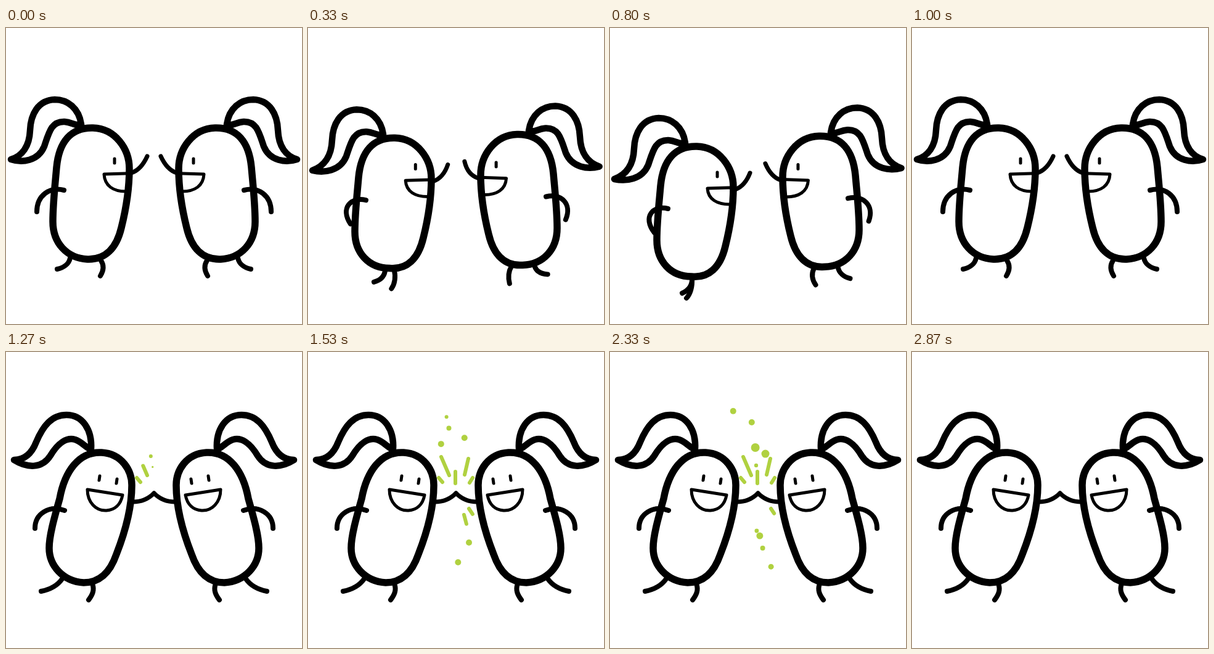
Recreate the animation shown at these times as an HTML page with a canvas. Size 480 by 480 pixels, loop 3.27 s.

```html
<!DOCTYPE html>
<html lang="en">
<head>
<meta charset="utf-8">
<title>High five</title>
<style>
  html, body { margin: 0; width: 100%; height: 100%; overflow: hidden; background: #fff; }
  canvas { display: block; width: 480px; height: 480px; }
</style>
</head>
<body>
<canvas id="stage" width="480" height="480"></canvas>
<script>
const ctx = document.getElementById('stage').getContext('2d');
const LOOP = 3270, STEP = 200 / 3, LAST = 43;
const GREEN = '#b0d140';

// Poses of the left figure; the right one is its mirror image.
const stand = {
  body: 'M141 162 C177 163 200 196 200 228 C200 262 193 300 187 324 C179 358 160 376 132 375 C98 373 76 348 76 314 C76 284 80 250 82 226 C86 184 106 161 141 162Z',
  tail: 'M122 156 C118 130 100 116 79 116 C52 117 40 140 39 166 C38 192 26 208 8 213 C26 219 52 216 62 192 C70 168 74 151 95 152 C108 153 114 160 122 156Z',
  eyes: 'M176 212 L176 219 M205 214 L205 221',
  mouth: 'M159 237 L222 235 C220 258 210 265 194 265 C174 265 160 256 159 237Z',
  arm: 'M203 235 Q219 230 229 208',
  back: 'M94 263 C70 257 50 272 50 298',
  legs: 'M104 373 C102 383 93 389 83 391 M154 377 C160 386 158 394 153 402'
};
const step = {
  ...stand,
  arm: 'M203 235 Q224 230 225 207',
  legs: 'M104 374 C100 383 92 385 80 384 M158 377 C166 385 166 394 166 402'
};
const dip = {
  ...stand,
  body: stand.body.replace('132 375', '132 373'),
  tail: stand.tail.replace('8 213', '7 215'),
  eyes: 'M174 204 L174 211 M205 206 L205 213',
  mouth: 'M158 230 L222 228 C220 249 210 256 194 256 C174 256 159 248 158 230Z',
  arm: 'M203 232 Q219 226 227 205',
  back: 'M94 263 C70 257 52 276 72 302',
  legs: 'M133 375 C134 388 126 396 117 400 M133 375 C134 390 130 402 124 408'
};
const clap = {
  body: 'M155 163 C188 165 204 192 204 216 C204 256 190 300 179 328 C168 360 150 374 126 374 C92 372 70 346 70 318 C70 298 78 270 87 238 C95 194 118 161 155 163Z',
  tail: 'M138 158 C140 126 124 102 98 102 C74 102 60 120 49 146 C42 164 30 175 13 175 C34 188 58 190 72 168 C84 148 98 138 112 142 C124 146 130 156 138 158Z',
  eyes: 'M152 201 L151 208 M180 206 L179 213',
  mouth: 'M132 223 L189 232 C186 248 176 256 163 257 C146 258 132 244 132 223Z',
  arm: 'M206 243 Q226 243 240 229',
  back: 'M95 257 C70 248 47 262 47 286',
  legs: 'M91 368 C84 378 72 385 57 388 M140 376 C144 386 140 394 134 402'
};

// [time, pose, drop]
const leftKeys = [[0, stand, 0], [267, dip, 19], [533, step, 0], [800, dip, 30], [1000, stand, 0], [1140, clap, 0]];
const rightKeys = [[0, stand, 0], [227, dip, 19], [455, step, 0], [682, dip, 28], [910, stand, 0], [1000, stand, 0], [1140, clap, 0]];

const ease = p => (1 - Math.cos(Math.PI * p)) / 2;
const clamp = v => Math.max(0, Math.min(1, v));
const lerp = (a, b, k) => a + (b - a) * k;

function mix(a, b, k) {
  const ends = b.match(/\d+/g);
  let i = 0;
  return a.replace(/\d+/g, n => lerp(+n, +ends[i++], k).toFixed(2));
}

function poseAt(keys, t) {
  let i = 0;
  while (i < keys.length - 2 && t >= keys[i + 1][0]) i++;
  const [t0, a, y0] = keys[i], [t1, b, y1] = keys[i + 1];
  const k = ease(clamp((t - t0) / (t1 - t0)));
  // Feet stay apart longer than the body stays up.
  const feet = b === dip ? k * k : a === dip ? 1 - (1 - k) ** 2 : k;
  const pose = { drop: lerp(y0, y1, k) };
  for (const part in a) pose[part] = new Path2D(mix(a[part], b[part], part === 'legs' ? feet : k));
  return pose;
}

function stroke(path, width, fill) {
  ctx.lineWidth = width;
  if (fill) ctx.fill(path);
  ctx.stroke(path);
}

function drawFigure(keys, t, mirrored) {
  const p = poseAt(keys, t);
  ctx.save();
  if (mirrored) ctx.transform(-1, 0, 0, 1, 480, 0);
  ctx.translate(0, p.drop);
  ctx.strokeStyle = '#000';
  ctx.fillStyle = '#fff';
  stroke(p.legs, 8);
  stroke(p.arm, 7);
  stroke(p.tail, 10.5, true);
  ctx.fill(p.body);
  ctx.save();
  ctx.clip(p.body);
  stroke(p.eyes, 5);
  stroke(p.mouth, 5);
  ctx.restore();
  stroke(p.body, 11.5);
  stroke(p.back, 8);
  ctx.restore();
}

// Inner end, outer end; clockwise from the upper left.
const rays = [
  [218, 211, 212, 204], [229, 200, 216, 170], [239, 213, 239, 194], [254, 199, 260, 173], [262, 212, 267, 204],
  [261, 254, 267, 263], [253, 264, 262, 298], [241, 254, 241, 273], [224, 264, 218, 293], [218, 256, 213, 264]
];

function drawRays(t) {
  ctx.strokeStyle = GREEN;
  ctx.lineWidth = 6;
  rays.forEach(([x0, y0, x1, y1], i) => {
    const grow = clamp((t - 1160 - i * 55) / 100);
    const left = clamp((2330 + (6 - i) * 55 - t) / 60);
    const k = Math.min(grow, left);
    if (!k) return;
    ctx.beginPath();
    ctx.moveTo(x0, y0);
    ctx.lineTo(lerp(x0, x1, k), lerp(y0, y1, k));
    ctx.stroke();
  });
}

// [birth, end x, end y, radius]
const dots = [
  [1180, 222, 89, 3], [1235, 225, 100, 4], [1290, 262, 108, 5], [1310, 200, 118, 5],
  [1300, 246, 385, 5], [1345, 282, 346, 5], [1551, 205, 380, 5],
  [1910, 197, 89, 5], [1987, 228, 98, 5], [2157, 232, 112, 7], [2204, 275, 112, 6.5], [2283, 225, 118, 5],
  [1978, 265, 362, 4.5], [2136, 255, 360, 4], [2208, 250, 350, 5.5], [2255, 234, 360, 3.5]
];

function drawDots(t) {
  ctx.fillStyle = GREEN;
  for (const [birth, x, y, r] of dots) {
    const age = t - birth, u = age / 550;
    if (u <= 0 || u >= 1) continue;
    const k = Math.sin(u * Math.PI / 2);
    ctx.globalAlpha = clamp((1 - u) * 5);
    ctx.beginPath();
    ctx.arc(lerp(239, x, k), lerp(y < 240 ? 195 : 270, y, k), r * clamp(age / 80), 0, 7);
    ctx.fill();
  }
  ctx.globalAlpha = 1;
}

function draw(now) {
  const t = Math.min(LAST, Math.floor((now % LOOP + 3.4) / STEP)) * STEP;
  ctx.fillStyle = '#fff';
  ctx.fillRect(0, 0, 480, 480);
  ctx.lineCap = ctx.lineJoin = 'round';
  drawFigure(leftKeys, t, false);
  drawFigure(rightKeys, t, true);
  drawRays(t);
  drawDots(t);
}

const start = performance.now();
function tick() {
  draw(performance.now() - start);
  requestAnimationFrame(tick);
}
tick();
</script>
</body>
</html>
```
